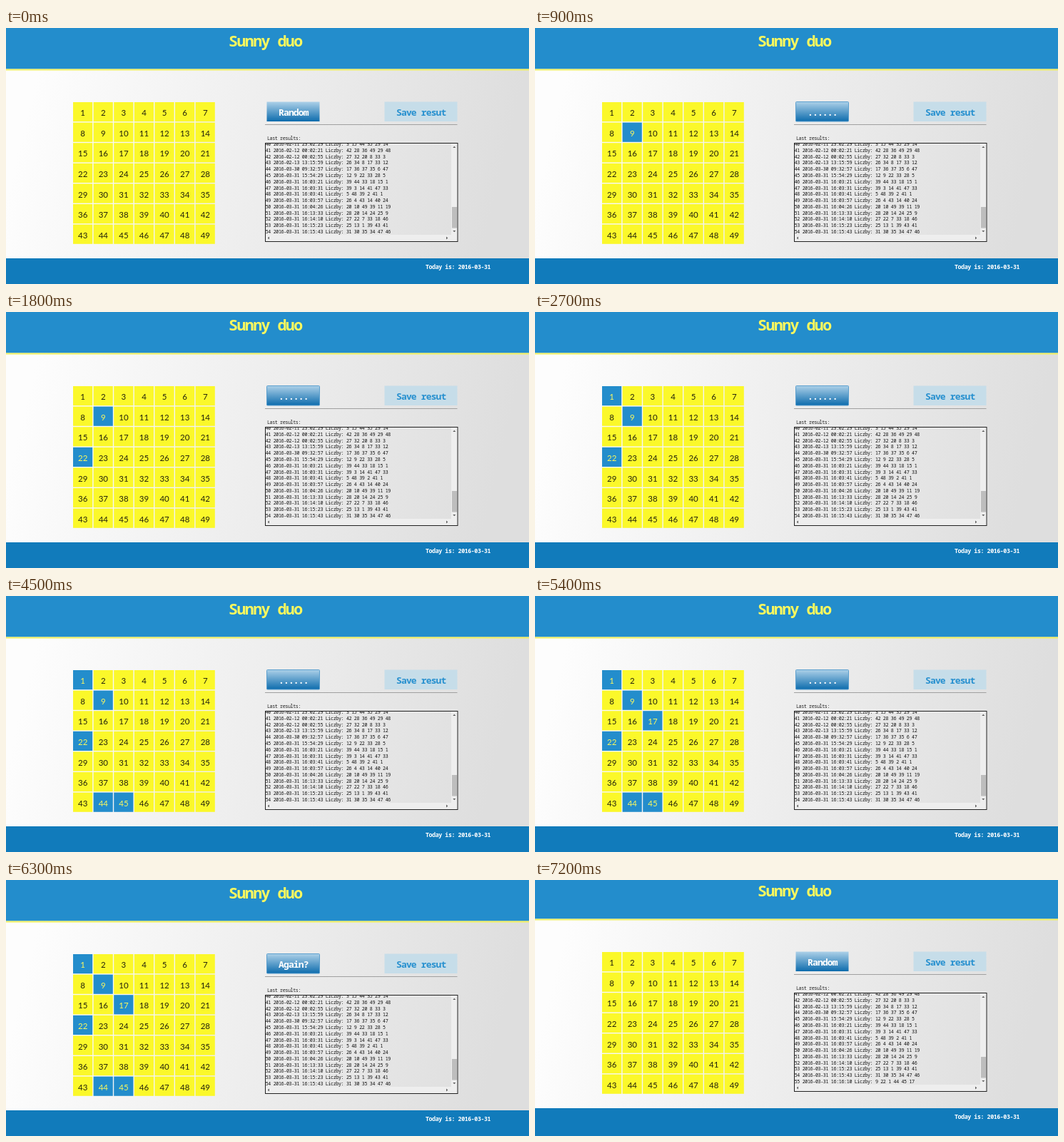
An HTML page that plays this animation: 733x359 px, repeating every 8100 ms.

```html
<!DOCTYPE html>
<html lang="en">
<head>
<meta charset="utf-8">
<title>Number draw</title>
<style>
  html, body { margin: 0; width: 100%; height: 100%; overflow: hidden; }
  svg { display: block; width: 100%; height: 100%; }
  text { white-space: pre; }
  .mono { font-family: "Noto Sans Mono", monospace; }
  .bold { font-weight: 700; }
  .number { font: 11.5px Lato, sans-serif; text-anchor: middle; }
</style>
</head>
<body>
<svg id="stage" viewBox="0 0 733 359">
  <defs>
    <linearGradient id="paper" x2="1" y2="0.12">
      <stop offset="0.08" stop-color="#fdfdfd"/>
      <stop offset="1" stop-color="#dedede"/>
    </linearGradient>
    <linearGradient id="button" x2="0" y2="1">
      <stop offset="0" stop-color="#acd0e8"/>
      <stop offset="1" stop-color="#0d6cad"/>
    </linearGradient>
    <clipPath id="listClip"><rect x="363" y="162" width="261" height="128"/></clipPath>
  </defs>
  <rect width="733" height="359" fill="url(#paper)"/>
  <g id="page"></g>
</svg>
<script>
const STEP = 900, STEPS = 9;
const BLUE = '#238dcc', YELLOW = '#fbf85e', CELL = '#fbf82a';
const PICKS = [9, 22, 1, 44, 45, 17];
const FIRST_ID = 40, ROW_HEIGHT = 8.78;
const RESULTS = `
02-11 23:02:29 Liczby: 3 15 44 35 29 14
02-12 00:02:21 Liczby: 42 28 36 49 29 48
02-12 00:02:55 Liczby: 27 32 20 8 33 3
02-13 13:15:59 Liczby: 26 34 8 17 33 12
03-30 09:32:57 Liczby: 17 36 37 35 6 47
03-31 15:54:29 Liczby: 12 9 22 33 28 5
03-31 16:03:21 Liczby: 39 44 33 18 15 1
03-31 16:03:31 Liczby: 39 3 14 41 47 33
03-31 16:03:41 Liczby: 5 48 39 2 41 1
03-31 16:03:57 Liczby: 26 4 43 14 40 24
03-31 16:04:26 Liczby: 20 10 49 39 11 19
03-31 16:13:33 Liczby: 28 20 14 24 25 9
03-31 16:14:10 Liczby: 27 22 7 33 18 46
03-31 16:15:23 Liczby: 25 13 1 39 43 41
03-31 16:15:43 Liczby: 31 30 35 34 47 46
03-31 16:16:10 Liczby: ${PICKS.join(' ')}`.trim().split('\n');

const page = document.getElementById('page');

function add(tag, attrs, parent = page) {
  const node = document.createElementNS('http://www.w3.org/2000/svg', tag);
  for (const name in attrs) node.setAttribute(name, attrs[name]);
  return parent.appendChild(node);
}

const box = (x, y, width, height, fill, extra) =>
  add('rect', { x, y, width, height, fill, ...extra });

// Narrow monospace: letter spacing brings the 0.6em advance down to the given one.
function mono(content, x, y, size, advance, fill, bold, parent) {
  const node = add('text', {
    x, y, fill, class: bold ? 'mono bold' : 'mono',
    'font-size': size, 'letter-spacing': advance - 0.6 * size
  }, parent);
  node.textContent = content;
  return node;
}

const arrow = (x, y, angle) => add('path', {
  d: 'M-2 1L0 -1.3L2 1Z', fill: '#606060', transform: `translate(${x} ${y}) rotate(${angle})`
});

// Header and footer
box(0, 0, 733, 57.5, BLUE);
box(0, 57.5, 733, 2, '#f3f160');
mono('Sunny duo', 312, 26, 21.5, 11.4, YELLOW, true);
box(0, 323, 733, 40, '#117bbb');
mono('Today is: 2016-03-31', 588, 338, 8.3, 4.56, '#fff', true);

// Number board
const cells = Array.from({ length: 49 }, (_, i) => {
  const x = 94 + (i % 7) * 28.6, y = 104 + Math.floor(i / 7) * 28.6;
  const tile = box(x, y, 27.2, 27.2, CELL);
  const label = add('text', { x: x + 13.7, y: y + 19.2, class: 'number' });
  label.textContent = i + 1;
  return { tile, label };
});

// Buttons
const button = box(365.5, 103.5, 74, 27.5, 'url(#button)');
const buttonLabel = mono('', 382, 122.5, 13, 6.95, '#fff', true);
box(530.5, 103.5, 102, 27.5, '#c6dde9');
mono('Save resut', 547, 122.5, 13, 6.95, '#2790cf', true);
box(363, 135, 269.5, 1, '#a0a0a0');

// Result list
mono('Last results:', 366, 157, 6.8, 3.62, '#222', false);
const clip = add('g', { 'clip-path': 'url(#listClip)' });
const rows = add('g', {}, clip);
RESULTS.forEach((line, i) =>
  mono(`${FIRST_ID + i} 2016-${line}`, 363.7, 288 + (i - 14) * ROW_HEIGHT, 6.7, 3.66, '#111', false, rows));
box(624, 162, 9, 137, '#eeeeee');
box(363.5, 290, 269, 9, '#eeeeee');
box(625, 251, 7, 29.5, '#bdbdbd');
arrow(628.3, 167, 0);
arrow(628.3, 285, 180);
arrow(368, 294.5, -90);
arrow(618, 294.5, 90);
box(363.5, 161.5, 269.5, 138, 'none', { stroke: '#222' });

function draw(now) {
  const step = Math.floor(now / STEP) % STEPS;
  const saved = step === 8, idle = step === 0 || saved;
  const picked = saved ? [] : PICKS.slice(0, step);

  cells.forEach(({ tile, label }, i) => {
    const on = picked.includes(i + 1);
    tile.setAttribute('fill', on ? BLUE : CELL);
    label.setAttribute('fill', on ? YELLOW : '#22220c');
  });
  buttonLabel.textContent = idle ? 'Random' : step === 7 ? 'Again?' : '......';
  button.setAttribute('stroke', idle ? 'none' : '#5b9fce');
  button.setAttribute('rx', idle ? 0 : 1);
  rows.setAttribute('transform', `translate(0 ${saved ? -ROW_HEIGHT : 0})`);
  page.setAttribute('transform', `translate(0 ${saved ? -3 : 0})`);
}

const start = performance.now();
function tick() {
  draw(performance.now() - start);
  requestAnimationFrame(tick);
}
tick();
</script>
</body>
</html>
```
